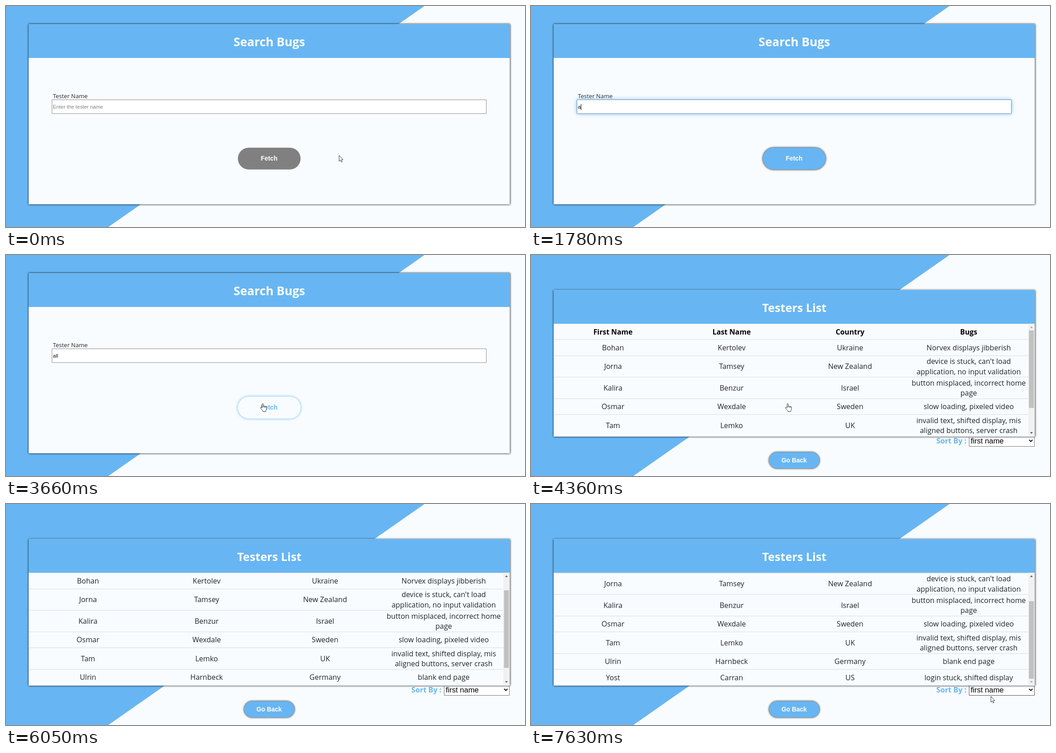
An HTML page with a canvas that plays this animation: 1146x489 px, repeating every 8000 ms.

```html
<!DOCTYPE html>
<html lang="en">
<head>
<meta charset="utf-8">
<title>Search Bugs</title>
<style>
html, body { margin: 0; width: 100%; height: 100%; overflow: hidden; background: #f9fcff; }
canvas { display: block; }
</style>
</head>
<body>
<canvas id="stage" width="1146" height="489"></canvas>
<script>
const ctx = document.getElementById('stage').getContext('2d');
const LOOP = 8000;
const BLUE = '#67b6f3', PALE = '#f9fcff', INK = '#212529';
const SANS = '"Open Sans", "Noto Sans", sans-serif';
const ARIAL = '"Liberation Sans", Arial, sans-serif';

const ARROW = new Path2D('M.5 .5V13.6L3.4 10.9 5.5 15.4 7.4 14.5 5.4 10.1H9.2Z');
const HAND = new Path2D('M4.5 10V2.2Q4.5 .8 5.8 .8T7.1 2.2V6.5Q8.6 5.6 9.6 6.8 11 6 12 7.3 14 6.8 14.2 9V13Q14 15 12.6 16.5V18.5H6.4V17Q3.5 14 1 10.8 .4 9 2.2 9.2Z');

// Each entry holds until the next one: start time, then the state.
const POINTER = [
  [0, ARROW, 735, 330], [100, ARROW, 714, 321], [200, ARROW, 655, 293],
  [300, ARROW, 588, 257], [400, ARROW, 543, 234], [500],
  [3280, ARROW, 545, 246], [3370, ARROW, 552, 272], [3470, ARROW, 560, 301],
  [3560, HAND, 561, 328], [4770, ARROW, 566, 329],
  [5260, ARROW, 612, 323], [5360, ARROW, 728, 304], [5450, ARROW, 813, 288], [5550],
  [6740, ARROW, 1012, 408], [6840, ARROW, 1015, 418], [7630, ARROW, 1015, 425]
];
const TYPED = [[0, ''], [1780, 'a'], [2580, 'al'], [2780, 'all']];
const CARET = [[0, false], [900, true], [1490, false], [1780, true], [2290, false], [2580, true], [3280, false]];
const SCROLL = [[0, 0], [6050, 35], [6140, 70]];
const SELECT_BORDER = [[0, '#767676'], [6740, '#4f4f4f'], [7130, '#101010'], [7230, '#4f4f4f']];

const COLUMNS = [181, 443, 704.5, 966.5];
const ROWS = [
  ['First Name', 'Last Name', 'Country', 'Bugs'],
  ['Bohan', 'Kertolev', 'Ukraine', 'Norvex displays jibberish'],
  ['Jorna', 'Tamsey', 'New Zealand', "device is stuck, can't load\napplication, no input validation"],
  ['Kalira', 'Benzur', 'Israel', 'button misplaced, incorrect home\npage'],
  ['Osmar', 'Wexdale', 'Sweden', 'slow loading, pixeled video'],
  ['Tam', 'Lemko', 'UK', 'invalid text, shifted display, mis\naligned buttons, server crash'],
  ['Ulrin', 'Harnbeck', 'Germany', 'blank end page'],
  ['Yost', 'Carran', 'US', 'login stuck, shifted display']
];

const stateAt = (track, t) => track.findLast(entry => entry[0] <= t);

function text(string, x, y, font, color, align = 'left') {
  ctx.font = font;
  ctx.fillStyle = color;
  ctx.textAlign = align;
  ctx.fillText(string, x, y);
}

function box(x, y, w, h, { fill, radius = 0, glow, blur = 4, stroke }) {
  ctx.beginPath();
  ctx.roundRect(x, y, w, h, radius);
  ctx.save();
  if (glow) {
    ctx.shadowColor = glow;
    ctx.shadowBlur = blur;
  }
  ctx.fillStyle = fill;
  ctx.fill();
  ctx.restore();
  if (stroke) {
    ctx.strokeStyle = stroke;
    ctx.lineWidth = 1;
    ctx.stroke();
  }
}

function triangle(x, y, dy, color) {
  ctx.fillStyle = color;
  ctx.beginPath();
  ctx.moveTo(x - 3, y);
  ctx.lineTo(x + 3, y);
  ctx.lineTo(x, y + dy);
  ctx.fill();
}

function background() {
  ctx.fillStyle = PALE;
  ctx.fillRect(0, 0, 1146, 489);
  ctx.fillStyle = BLUE;
  ctx.beginPath();
  ctx.moveTo(0, 0);
  ctx.lineTo(924, 0);
  ctx.lineTo(226, 489);
  ctx.lineTo(0, 489);
  ctx.fill();
}

function card(top, bottom, title, size) {
  box(50, top, 1062.5, bottom - top, { fill: PALE, glow: '#000' });
  box(50, top, 1062.5, 74.7, { fill: BLUE });
  text(title, 581.5, top + 48.5, `bold ${size}px ${SANS}`, '#fff', 'center');
}

function searchPage(t) {
  const focused = t >= 900 && t < 3660;
  const hovered = t >= 3560;
  const typed = stateAt(TYPED, t)[1];

  card(40.3, 438.7, 'Search Bugs', 26.3);
  text('Tester Name', 103.5, 204, `13px ${SANS}`, INK);
  box(101.5, 207.5, 959, 30.5, {
    fill: '#fff', stroke: focused ? '#7590a8' : '#8a8a8a',
    glow: focused && BLUE, blur: 10
  });
  text(typed || 'Enter the tester name', 103.5, 227, `11.55px ${ARIAL}`, typed ? '#111' : '#808080');
  if (stateAt(CARET, t)[1]) {
    ctx.font = `11.55px ${ARIAL}`;
    ctx.fillStyle = '#000';
    ctx.fillRect(Math.round(103.5 + ctx.measureText(typed).width), 217, 1, 13);
  }

  const look = hovered ? { fill: PALE, glow: BLUE, blur: 6 }
    : typed ? { fill: BLUE, glow: '#000' }
    : { fill: '#808080' };
  box(512, 313.5, 138.5, 48.3, { ...look, radius: 24.1 });
  text('Fetch', 581, 342, `bold 13.9px ${ARIAL}`, hovered ? BLUE : '#fff', 'center');
}

function table(scroll) {
  ctx.save();
  ctx.beginPath();
  ctx.rect(50, 152, 1062.5, 250);
  ctx.clip();
  let top = 152 - scroll;
  ROWS.forEach((row, index) => {
    const height = row[3].includes('\n') ? 47.6 : 35.3;
    const font = index ? `16px ${SANS}` : `bold 15.8px ${SANS}`;
    row.forEach((cell, column) => {
      const lines = cell.split('\n');
      lines.forEach((line, i) => {
        const y = top + height / 2 + 6 + (i - (lines.length - 1) / 2) * 22.4;
        text(line, COLUMNS[column], y, font, index ? INK : '#000', 'center');
      });
    });
    top += height;
    ctx.fillStyle = '#d5dade';
    ctx.fillRect(50, Math.round(top) - 0.5, 1048, 1);
  });
  ctx.restore();
}

function scrollbar(scroll) {
  box(1098, 152, 14, 250, { fill: '#f1f1f1' });
  box(1099.5, 167 + scroll * 48 / 70, 11, 171.5, { fill: '#c1c1c1' });
  triangle(1105, 161.5, -3.5, scroll > 0 ? '#505050' : '#a3a3a3');
  triangle(1105, 392, 3.5, scroll < 70 ? '#505050' : '#a3a3a3');
}

function listPage(t) {
  const scroll = stateAt(SCROLL, t)[1];

  text('Sort By :', 895, 416.5, `bold 16.2px ${SANS}`, BLUE);
  box(967.5, 398.5, 144, 25, { fill: '#fff', stroke: stateAt(SELECT_BORDER, t)[1] });
  text('first name', 971, 416.5, `16.6px ${ARIAL}`, '#000');
  ctx.strokeStyle = '#000';
  ctx.lineWidth = 1.8;
  ctx.stroke(new Path2D('M1100 409L1103.7 412.7L1107.4 409'));

  card(77.5, 402, 'Testers List', 25.2);
  table(scroll);
  scrollbar(scroll);

  box(525.8, 436.5, 111, 35.5, { fill: BLUE, radius: 17.7, glow: '#000' });
  text('Go Back', 581, 459, `bold 13.8px ${ARIAL}`, '#fff', 'center');
}

function pointer(t) {
  const [, shape, x, y] = stateAt(POINTER, t);
  if (!shape) return;
  ctx.save();
  ctx.translate(x, y);
  ctx.fillStyle = '#fff';
  ctx.strokeStyle = '#222';
  ctx.lineWidth = 0.9;
  ctx.fill(shape);
  ctx.stroke(shape);
  if (shape === HAND) ctx.stroke(new Path2D('M7.1 6.5V9.5M9.6 6.8V9.8M12 7.3V10'));
  ctx.restore();
}

function draw(now) {
  const t = now % LOOP;
  background();
  if (t < 4360) searchPage(t);
  else listPage(t);
  pointer(t);
}

const start = performance.now();
function frame() {
  draw(performance.now() - start);
  requestAnimationFrame(frame);
}
frame();
</script>
</body>
</html>
```
